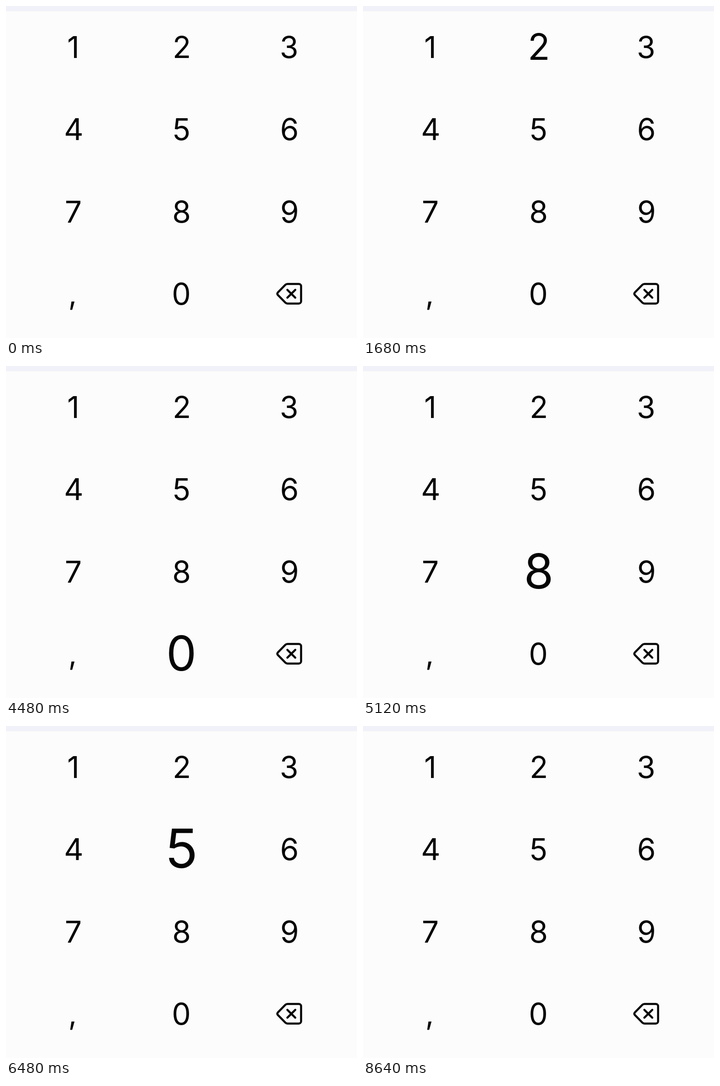
Recreate the animation shown at these times as an HTML page with a canvas. Size 769x728 px, loop 8800 ms.

```html
<!DOCTYPE html>
<html lang="en">
<head>
<meta charset="utf-8">
<title>Keypad</title>
<style>
html, body { margin: 0; width: 769px; height: 728px; overflow: hidden; background: #fcfcfc; }
canvas { display: block; }
</style>
</head>
<body>
<canvas id="stage" width="769" height="728"></canvas>
<script>
const ctx = document.getElementById('stage').getContext('2d');
const LOOP = 8800, STEP = 80, PEAK = 1.8;
const COLS = [147.5, 384, 621], ROW0 = 92.4, ROW_GAP = 180.4;
const BASELINE = 21.6; // below the middle of a row

// ink centre of each label, row by row
const KEYS = [
  ['1', 146.6], ['2', 385], ['3', 620.2],
  ['4', 148], ['5', 385], ['6', 620.5],
  ['7', 147.7], ['8', 384.2], ['9', 620.8],
  [',', 145.6], ['0', 383.8], ['<', 621.4]
].map(([label, ink], i) => ({
  label, ink,
  x: label === '<' ? ink : COLS[i % 3],
  y: ROW0 + ROW_GAP * Math.floor(i / 3)
}));

// [start, key, hold at the peak]
const PRESSES = [
  [240, '1'], [480, '5'], [720, '9'], [960, '8'],
  [1200, '3'], [1520, '2'], [1840, '3'],
  [2800, '<'], [3840, '<'], [4080, '<'],
  [4320, '0', 80], [4560, '3'], [4800, '2'], [5040, '8'], [5200, '9'],
  [5440, '2'], [5680, '3'], [5920, '2'], [6160, '1'],
  [6480, '5', 80], [6800, '<'], [7040, '<'], [7280, '4'],
  [8240, '<'], [8480, '<']
];

const outline = new Path2D(
  'M616.8 609.4H641.5a5 5 0 0 1 5 5V647.4a5 5 0 0 1-5 5H616.8' +
  'Q614 652.4 612 650.4L595.6 633.7Q593.2 630.9 595.6 628.1' +
  'L612 611.4Q614 609.4 616.8 609.4Z');
const cross = new Path2D('M616.4 622.3l17.4 17.4M633.8 622.3l-17.4 17.4');

const smooth = p => p * p * (3 - 2 * p);

function scaleAt(label, time) {
  const duration = label === '<' ? 160 : 240;
  let scale = 1;
  for (const [start, key, hold = 0] of PRESSES) {
    if (key !== label || time < start) continue;
    const p = Math.max(0, time - start - hold) / duration;
    if (p < 1) scale = PEAK - (PEAK - 1) * smooth(p);
  }
  return scale;
}

// baselines sit on whole pixels so resting digits stay crisp
function drawLabel({ label, ink, y }) {
  const m = ctx.measureText(label);
  const middle = (m.actualBoundingBoxRight - m.actualBoundingBoxLeft) / 2;
  ctx.fillText(label, ink - middle, Math.round(y + BASELINE));
}

function drawKey(key, time) {
  const scale = scaleAt(key.label, time);
  ctx.save();
  ctx.translate(key.x, key.y);
  ctx.scale(scale, scale);
  ctx.translate(-key.x, -key.y);
  if (key.label === '<') {
    ctx.stroke(outline);
    ctx.stroke(cross);
  } else {
    drawLabel(key);
  }
  ctx.restore();
}

function draw(time) {
  ctx.fillStyle = '#fcfcfc';
  ctx.fillRect(0, 0, 769, 728);
  ctx.fillStyle = '#f1f1f9';
  ctx.fillRect(0, 0, 769, 11.5);
  ctx.fillStyle = ctx.strokeStyle = '#050505';
  ctx.font = '400 66px Inter, sans-serif';
  ctx.lineWidth = 4.5;
  ctx.lineCap = ctx.lineJoin = 'round';
  for (const key of KEYS) drawKey(key, time);
}

const origin = performance.now();
function tick() {
  const time = (performance.now() - origin) % LOOP;
  draw(Math.floor(time / STEP) * STEP);
  requestAnimationFrame(tick);
}
tick();
</script>
</body>
</html>
```
